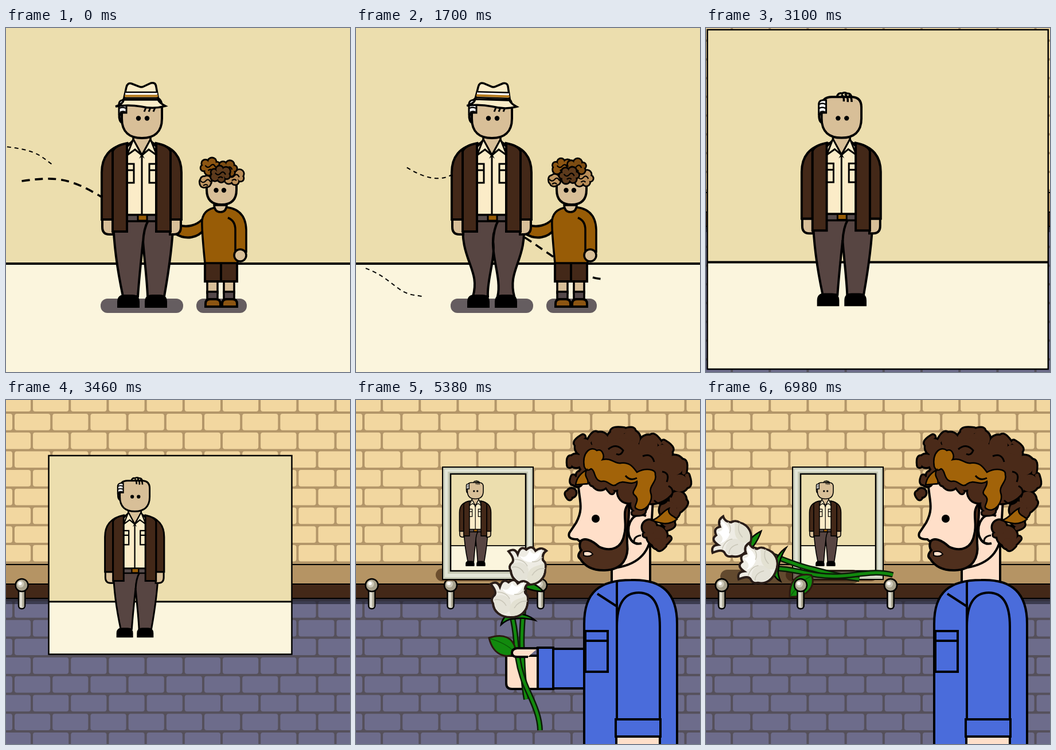
An HTML page with a canvas for the animation above (8 s loop, 600x600 px).

```html
<!DOCTYPE html>
<html lang="en">
<head>
<meta charset="utf-8">
<title>Hat in the wind</title>
<style>
html, body { margin: 0; height: 100%; overflow: hidden; }
canvas { display: block; width: 600px; height: 600px; }
</style>
</head>
<body>
<canvas id="stage" width="600" height="600"></canvas>
<script>
const c = document.getElementById('stage').getContext('2d');
const BROWN = '#432818', SKIN = '#d8bf98', CREAM = '#fbecc8', SAND = '#ecdeae', RUST = '#985c06',
  TROUSER = '#574542', PALE = '#ffdfc9', BLUE = '#4a6cdb', HAIR = '#4a2a19', GREEN = '#128a0e';

const clamp = v => Math.max(0, Math.min(1, v));
const mix = (a, b, p) => a + (b - a) * p;
const smooth = p => p * p * (3 - 2 * p);
const backOut = p => 1 + 2.7 * (p - 1) ** 3 + 1.7 * (p - 1) ** 2;

function shape(d, fill, width = 4, stroke = '#000') {
  const path = new Path2D(d);
  if (fill) { c.fillStyle = fill; c.fill(path); }
  if (width) { c.lineWidth = width; c.strokeStyle = stroke; c.stroke(path); }
}
function box(x, y, w, h, fill, width = 0, r = 0) {
  c.beginPath();
  c.roundRect(x, y, w, h, r);
  if (fill) { c.fillStyle = fill; c.fill(); }
  if (width) { c.lineWidth = width; c.strokeStyle = '#000'; c.stroke(); }
}
function dot(x, y, r, fill = '#000', width = 0) {
  c.beginPath();
  c.arc(x, y, r, 0, 7);
  c.fillStyle = fill;
  c.fill();
  if (width) { c.lineWidth = width; c.strokeStyle = '#000'; c.stroke(); }
}
// Draw around a pivot that is moved to (x, y), turned and scaled.
function placed(x, y, px, py, degrees, scale, draw) {
  c.save();
  c.translate(x, y);
  c.rotate(degrees * Math.PI / 180);
  c.scale(scale, scale);
  c.translate(-px, -py);
  draw();
  c.restore();
}

/* ---- wind ---- */
const gusts = [
  { d: 'M-200,230C-130,215 -60,200 0,207S60,225 85,241S140,270 165,257S300,150 420,190S560,250 750,200', from: 178, speed: .66, len: 115 },
  { d: 'M-200,300C-120,280 -30,275 27,267S110,260 167,295S260,345 292,364S380,430 422,437S560,430 750,400', from: 230, speed: .76, len: 150, thick: 1 },
  { d: 'M-200,400C-120,370 -40,400 11,417S70,462 102,466S250,500 350,470S500,440 750,490', from: 92, speed: .665, len: 105 }
];
function spiral(cx, cy, r) {
  let d = `M${cx - 250},${cy + r - 150}Q${cx - 45},${cy + r} ${cx},${cy + r}`;
  for (let u = 0; u <= 1; u += .02) {
    const a = Math.PI * (.5 - 2.5 * u), k = r * Math.sqrt(1 - u);
    d += `L${cx + k * Math.cos(a)},${cy + k * Math.sin(a)}`;
  }
  return d;
}
const curls = [
  { d: spiral(150, 194, 36), from: 288, len: 260 },
  { d: spiral(318, 244, 61), from: 288, len: 440, thick: 1 },
  { d: spiral(447, 319, 72), from: 398, len: 100, thick: 1 },
  { d: spiral(117, 400, 36), from: 252, len: 145 }
];
function gust({ d, len, thick }, start) {
  const [on, off] = thick ? [14, 9] : [7, 6], dashes = [0, Math.max(0, start)];
  for (let s = 0; s < len; s += on + off) dashes.push(on, off);
  dashes[dashes.length - 1] = 9999;
  c.setLineDash(dashes);
  shape(d, null, thick ? 3.6 : 2);
  c.setLineDash([]);
}
function wind(t) {
  if (t < 1900) for (const g of gusts) gust(g, (g.from + g.speed * t) % 1000);
  else if (t < 2800) for (const g of curls) gust(g, g.from + (t - 2600) * .4);
}

/* ---- grandfather ---- */
function jacketSide(flipped) {
  shape('M168,334V347Q168,360 180,360H187V334Z', SKIN);
  shape('M212,202C180,206 167,226 167,252V334H186V220Z', BROWN);
  shape(flipped ? 'M186,215Q190,205 211,201V316Q190,332 184,355V334Z' : 'M186,355V215Q190,205 211,201V355Z', BROWN);
  if (flipped) shape('M207,318Q188,335 183,356Q201,345 207,338Z', '#cdaa76', 2.5);
}
function grandfather(flap, flipped, hatOn) {
  const k = flap;
  shape(`M187,334C${188 - 8 * k},${390 + 15 * k} ${198 + 20 * k},${440 - 20 * k} 204,468H230
    C${232 - 4 * k},440 ${236 + 8 * k},400 239,372C${241 - 4 * k},400 ${246 + 8 * k},440 247,468H276
    C${281 - 18 * k},${440 - 20 * k} ${290 + 10 * k},${390 + 15 * k} 292,334Z`, TROUSER);
  shape('M248,336Q240,350 239,374');
  for (const x of [195, 243])
    shape(`M${x},487V478Q${x},466 ${x + 12},466H${x + 25}Q${x + 37},466 ${x + 37},478V487Z`, '#000', 2);
  shape('M222,196L208,210V326H266V210L251,196Z', CREAM);
  box(207, 326, 60, 11, '#574c4c', 3.5);
  box(230, 326, 16, 10, RUST, 3);
  shape('M237,222V326', null, 3);
  for (const x of [208, 250]) {
    box(x, 237, 15, 33, CREAM, 3);
    shape(`M${x},248h15`, null, 3);
  }
  shape('M222,186V195L237,222L252,195V186Z', SKIN, 3.5);
  shape('M222,194L211,222L225,212L237,222ZM252,194L263,222L249,212L237,222Z', CREAM, 3);
  jacketSide(false);
  c.save();
  c.translate(473, 0);
  c.scale(-1, 1);
  jacketSide(flipped);
  c.restore();

  shape('M204,146Q196,148 198,158Q199,165 205,166', SKIN, 4);
  shape('M202,138Q202,120 220,120H254Q272,120 272,138V158C272,182 258,192 237,192C216,192 202,182 202,158Z', SKIN);
  dot(231, 157.5, 4.2);
  dot(246, 157.5, 4.2);
  shape('M197,150V132Q198,124 210,126V148H202Z', '#fff', 3);
  shape('M198,133q5,-3 11,0M198,140q5,-3 11,0M199,147q5,-3 10,0', null, 2.5);
  if (hatOn) shape('M241,146l3,-7M249,146l3,-7M257,146l3,-7', null, 3);
  else shape('M229,119Q232,112 238,114Q242,111 247,114Q254,113 255,122M237,116q5,4 4,12M243,115q6,5 5,14M250,116q5,4 5,13', null, 3.5);
}

function smallHat() {
  shape('M205,126L210,103Q212,95 219,97L232,102Q236,104 240,102L253,96Q261,94 262,103L266,126Z', CREAM, 3.5);
  shape('M208,114.500H264', null, 4, '#fff');
  shape('M207,118.500H265', null, 4, '#b57a1c');
  shape('M208,112H264M206,122H266', null, 2.5);
  shape('M191,137Q205,132 205,125H265Q268,131 278,136Q258,142 236,137Q212,133 191,137Z', CREAM, 3.5);
}
function bigHat() {
  shape('M360,395C338,430 338,452 348,470C362,490 386,488 398,508C408,530 420,541 440,541C466,540 482,524 503,508Z', SAND, 3);
  const band = 'M362,398C362,440 400,500 500,509';
  shape(band, null, 19);
  shape(band, null, 14, '#fff8e4');
  shape(band, null, 7);
  shape(band, null, 4.5, '#a8690f');
  const brim = (x, y, a, b, fill) => {
    c.beginPath();
    c.ellipse(x, y, a, b, .69, 0, 7);
    c.fillStyle = fill;
    c.fill();
    c.lineWidth = 3;
    c.stroke();
  };
  c.strokeStyle = '#000';
  brim(478, 395.500, 138, 92, SAND);
  brim(471, 399, 90, 59, BROWN);
}
function hat(t) {
  if (t < 2000) {
    const sway = t < 1900 ? 1.5 - 1.5 * Math.cos(t / 307 * 2 * Math.PI) : 4;
    return placed(236 + sway, t < 1900 ? 115 : 110, 236, 115, sway * .6, 1, smallHat);
  }
  const p = (t - 2000) / 600;
  placed(mix(245, 478, p) + Math.max(0, p - 1) * 500, 110 + 285 * Math.min(p, 1) ** 1.3, 478, 395,
    -40 * (1 - p), mix(.32, 1, p), bigHat);
}

/* ---- boy ---- */
function boyHead(t) {
  shape('M350,258V282Q350,308 376,308Q402,308 402,282V258Z', SKIN);
  dot(366.500, 283, 4.2);
  dot(380, 283, 4.2);
  const tones = ['#7d4c12', '#c09762', '#8c5512', '#5d3a1c', '#b98d58'];
  // Five lumpy tufts; each one sways in the wind.
  [[348, 266, 1], [396, 260, 4], [358, 243, 2], [386, 244, 0], [372, 255, 3]].forEach(([x, y, tone], i) => {
    const phase = t / 100 + i * 2;
    x += 2 * Math.sin(phase);
    y += 2 * Math.cos(phase);
    const lumps = [0, 1, 2, 3, 4, 5].map(k => {
      const a = k * 1.05 + Math.sin(phase) * .4, reach = i ? 10 : 4;
      return [x + reach * 1.2 * Math.cos(a), y + reach * .8 * Math.sin(a), 4.5 + k % 3];
    });
    lumps.forEach(([u, v, r]) => dot(u, v, r + 2.8));
    lumps.forEach(([u, v, r]) => dot(u, v, r, tones[tone]));
    dot(x, y, i ? 8 : 4, tones[tone]);
    shape(`M${x - 9},${y - 2}q4,6 9,1q5,-6 9,2M${x - 4},${y + 7}q5,-4 8,0`, null, 2.2);
  });
}
function boy(t) {
  const lean = clamp((t - 2000) / 400), free = lean > .2;
  c.save();
  c.translate(lean * 8 + Math.max(0, t - 2600) * 1.2, 0);
  c.save();
  c.translate(25 * lean, 10 * lean);
  for (const x of [351, 380]) {
    box(x, 440, 18, 22, SKIN, 3.5);
    box(x, 460, 18, 13, '#54484a', 3.5);
    shape(`M${x - 3},486V481Q${x - 3},473 ${x + 5},473H${x + 15}Q${x + 23},473 ${x + 23},481V486Z`, '#8c5512');
  }
  box(347, 410, 56, 32, BROWN, 4);
  shape('M375,410V442');
  c.restore();
  placed(375, 312 + 10 * lean, 375, 312, 8 * lean, 1, () => {
    if (!free) shape('M343,333C332,345 316,348 302,344L294,358C314,371 335,366 346,351Z', RUST);
    shape('M347,410C344,380 341,350 342,335Q345,313 375,312Q418,312 419,352V390L404,388V410Z', RUST, 3.5);
    shape('M387,331Q400,336 400,352V392', null, 3.5);
    dot(408.500, 396.500, 10.5, SKIN, 3.5);
    shape('M363,309Q364,321 374,321Q384,321 385,309Z', SKIN, 3.5);
  });
  if (free) {
    shape('M350,319Q335,330 305,380L325,394L340,368Z', RUST);
    dot(307, 394, 11, SKIN, 4);
  }
  c.translate(0, -2 * lean);
  boyHead(t);
  c.restore();
}

function scene(t, drop = 0) {
  const windy = t < 2900;
  box(-200, -200, 1000, 1000, SAND);
  box(-200, 411, 1000, 400, '#fbf5dd');
  shape('M-200,411H800');
  wind(t);
  if (windy) {
    box(165, 472, 144, 25, '#655d60', 0, 12);
    box(332, 472, 88, 25, '#655d60', 0, 12);
    if (t < 2400) boy(t);
  }
  c.save();
  c.translate(0, drop);
  grandfather(windy ? .5 - .5 * Math.cos(t / 307 * 2 * Math.PI) : 0, windy && t > 2200, t < 2000);
  c.restore();
  if (windy) {
    if (t >= 2400) boy(t);
    hat(t);
  }
}

/* ---- room ---- */
function room() {
  box(0, 0, 600, 300, '#b39669');
  box(0, 300, 600, 300, '#55505b');
  for (let row = 0; row < 19; row++) {
    if (row === 9 || row === 10) continue;
    for (let x = (row % 2 ? 13 : 45) - 66.2; x < 600; x += 66.2)
      box(x + 2, 22 + 32.7 * (row - 1) + 2, 62.2, 28.7, row < 9 ? '#f2d7a0' : '#6d6c8b', 0, 4);
  }
  box(0, 346, 600, 10, 'rgba(35,35,50,.65)');
  box(0, 287, 600, 34, '#b59464');
  box(0, 321, 600, 25, BROWN);
  shape('M0,287H600M0,321H600M0,346H600', null, 2);
}
function knobs() {
  for (const x of [27.5, 165, 322, 478.5]) {
    box(x - 5.5, 328, 11, 36, '#dedccf', 2.5, 5);
    box(x + 1, 332, 3, 29, '#a9a48f');
    dot(x, 323, 11, '#a8a28d', 2.5);
    dot(x - 2, 321, 6, '#cfcbbb');
    dot(x - 3, 320, 3, '#fff');
  }
}

// x, y, width, height, scale, the scene point in the top left corner, and how far the man stands lower
const crops = [[0, 0, 600, 600, 1, 0, 0, 0], [74.5, 97, 424, 346.5, .743, 35, 68, -7], [165, 129, 131, 169, .396, 128, 95, -13]];
function photo(t) {
  const late = t >= 3460;
  const p = late ? 1 - (1 - clamp((t - 3460) / 200)) ** 2 : clamp((t - 3060) / 400) ** 1.5;
  const [from, to] = late ? [crops[1], crops[2]] : crops;
  const [x, y, w, h, scale, ox, oy, lift] = from.map((v, i) => mix(v, to[i], p));
  const b = clamp((t - 3540) / 140);
  if (b > 0) {
    box(139, 294, 160, 22, `rgba(70,42,18,${.65 * b})`, 0, 11);
    box(x - 14 * b, y - 12 * b, w + 27 * b, h + 27 * b, '#c9cdb9', 2);
    box(x - 10 * b, y - 8 * b, w + 19 * b, h + 19 * b, '#e3e6d8');
    box(x - 5 * b, y - 4 * b, w + 9 * b, h + 9 * b, '#c6c9b4');
  }
  c.save();
  c.beginPath();
  c.rect(x, y, w, h);
  c.clip();
  placed(x, y, ox, oy, 0, scale, () => scene(t, -lift));
  c.restore();
  if (t > 3060) box(x, y, w, h, null, 2.5);
}

/* ---- roses ---- */
function rose(x, y) {
  placed(x, y, 0, 0, 0, 1, () => {
    shape('M-33,-24Q-22,-31 -17,-19Q-12,-35 -2,-27Q8,-36 14,-25Q24,-33 33,-25Q25,-20 27,-9Q34,-2 31,6C32,24 18,34 2,34C-16,34 -28,24 -29,10Q-34,2 -27,-4Q-21,-10 -33,-24Z', '#eeece4', 4, '#2a1d18');
    shape('M-26,-2C-12,-10 4,0 2,12C4,24 -8,32 -18,25C-28,14 -28,6 -26,-2Z', '#e4e2d7', 0);
    shape('M2,12C8,0 22,2 29,-4C33,16 22,32 4,32Q-4,24 2,12Z', '#e3e1d2', 0);
    shape('M-14,-17Q-2,-8 4,-27Q10,-12 25,-28Q22,-10 6,-5Q-8,-6 -14,-17Z', '#fff', 0);
    shape('M-22,-10Q-6,-10 0,2M8,-6Q18,-4 26,-14M-27,4Q-14,0 -6,14M31,6Q16,4 8,18', null, 1.5, '#c9c6b8');
  });
}
function roses() {
  const stem = d => { shape(d, null, 10, '#0c1a08'); shape(d, null, 5, GREEN); };
  stem('M292,320C296,360 286,400 290,440Q291,490 297,522');
  stem('M272,377C282,410 276,440 290,482C298,510 320,540 321,576');
  shape('M232,415C255,407 276,412 279,440C268,452 240,449 232,415Z', GREEN, 3, '#2b1a10');
  shape('M233,416Q262,424 277,440', null, 1.5, '#0a5c08');
  shape('M272,372Q256,376 253,392Q264,382 273,382Q290,378 312,384Q298,372 272,372Z', GREEN, 2.5);
  shape('M296,318Q312,318 327,334Q312,334 296,328Z', GREEN, 2.5);
  rose(299, 288);
  rose(268, 345);
}

/* ---- grown man ---- */
function arm() {
  box(344, 434, 70, 69, BLUE, 4);
  box(317, 432, 27, 72, BLUE, 4);
  shape('M317,446H262V494Q262,504 272,504H317Z', PALE);
}
function thumb() {
  shape('M317,433H281Q272,434 272,441Q272,448 281,448H300', PALE);
}
// Curly locks: the first 21 lie on the rim and end in a hook.
const locks = [[384, 106, 11], [397, 82, 14], [426, 72, 15], [455, 70, 17], [480, 68, 15], [510, 78, 16], [535, 94, 16],
  [555, 114, 17], [564, 145, 15], [561, 174, 14], [545, 192, 15], [544, 210, 11], [525, 237, 17], [512, 222, 12], [526, 250, 9],
  [494, 182, 14], [452, 143, 14], [426, 142, 14], [402, 131, 13], [386, 142, 8], [376, 162, 7],
  [476, 160, 19], [465, 112, 45], [515, 135, 45], [415, 105, 27]];
const hooks = locks.slice(0, 21).map(([x, y, r], i) => {
  const a = Math.atan2(y - 135, x - 475), turn = i % 2 ? .9 : -.9;
  const point = (k, angle) => `${x + r * k * Math.cos(angle)},${y + r * k * Math.sin(angle)}`;
  return `M${point(.4, a)}Q${point(1.6, a - turn * .4)} ${point(1.25, a + turn)}`;
}).join('');

function manHead() {
  shape('M446,255V325H513V235Z', PALE);
  shape('M387,130C386,170 400,185 384,214L372,232Q368,243 386,243L392,248V270Q410,296 440,294Q505,290 514,240L520,140Z', PALE);
  shape('M476,180C462,196 474,212 468,234C464,258 445,266 424,256C410,243 398,240 392,246Q388,256 393,262Q384,272 391,277Q404,298 434,297C466,296 476,274 473,250C471,226 478,205 476,182Z', '#4f2f1d');
  shape('M397,265Q408,262 413,269Q406,275 397,271Z', PALE, 2);
  dot(418, 207, 7);
  shape('M506,202C484,194 472,214 476,236Q482,254 498,250', PALE);
  shape('M497,236Q484,238 485,248', null, 3);

  locks.forEach(([x, y, r]) => dot(x, y, r + 3.5));
  c.lineCap = 'round';
  shape(hooks, null, 13);
  shape(hooks, null, 6.5, HAIR);
  c.lineCap = 'butt';
  locks.forEach(([x, y, r]) => dot(x, y, r, HAIR));
  shape('M398,116C394,90 410,80 420,88C430,84 434,98 430,104C445,100 452,112 462,110C478,108 484,118 490,126C504,118 524,120 522,130C526,142 510,150 514,162C520,178 502,198 490,190C480,186 498,176 486,166C478,160 492,152 490,142C478,150 466,138 456,146C446,156 440,138 428,142C414,140 418,122 410,120Q402,126 398,116ZM516,210C530,206 534,194 546,189C542,200 555,202 560,208C545,220 530,215 516,210ZM383,148C385,135 392,128 402,122C396,135 408,138 404,146Z', '#a26309', 2.5);
  shape('M440,86q14,-12 26,2q-4,10 -12,6M500,98q16,-6 20,10M534,125q14,2 8,18M545,150q12,6 4,20M520,175q12,12 22,2M470,132q8,10 20,4', null, 3);
}
function manBody() {
  manHead();
  shape('M398,610V390C398,335 425,314 480,314C535,312 560,338 560,390V610Z', BLUE);
  shape('M455,315V610M421,338L455,360');
  box(400, 403, 39, 71, BLUE, 4);
  shape('M400,420H439');
  box(454, 587, 76, 30, PALE, 4);
  shape('M455,557V395C455,353 470,336 493,336C516,336 530,353 530,395V557Z', BLUE);
  box(453, 557, 78, 30, BLUE, 4);
}

function draw(t) {
  if (t < 3060) return scene(t);
  room();
  knobs();
  photo(t);
  if (t < 4700) return;
  const slide = 658 * (1 - backOut(clamp((t - 4680) / 700)));
  const lay = smooth(clamp((t - 6280) / 700));
  const bouquet = () => placed(mix(321, 326, lay), mix(576, 305, lay) - 58 * Math.sin(Math.PI * lay), 321, 576, -73 * lay, 1, roses);
  if (lay > .9) {
    box(25, 296, 243, 24, 'rgba(45,26,12,.6)', 0, 12);
    bouquet();
    knobs();
  }
  c.save();
  c.translate(slide, 0);
  const swing = part => placed(mix(430, 446, lay), 468, 430, 468, -90 * lay, 1, part);
  if (lay < 1) swing(arm);
  if (lay <= .9) bouquet();
  if (lay < 1) swing(thumb);
  manBody();
  c.restore();
}

// The picture advances in held steps, faster while the camera pulls back.
function step(t) {
  const [size, shift] = t < 3020 ? [100, 0] : t < 4000 ? [40, 20] : [100, 80];
  return Math.floor((t - shift) / size) * size + shift;
}
function tick(now) {
  c.clearRect(0, 0, 600, 600);
  draw(step(now % 8000));
  requestAnimationFrame(tick);
}
requestAnimationFrame(tick);
</script>
</body>
</html>
```
